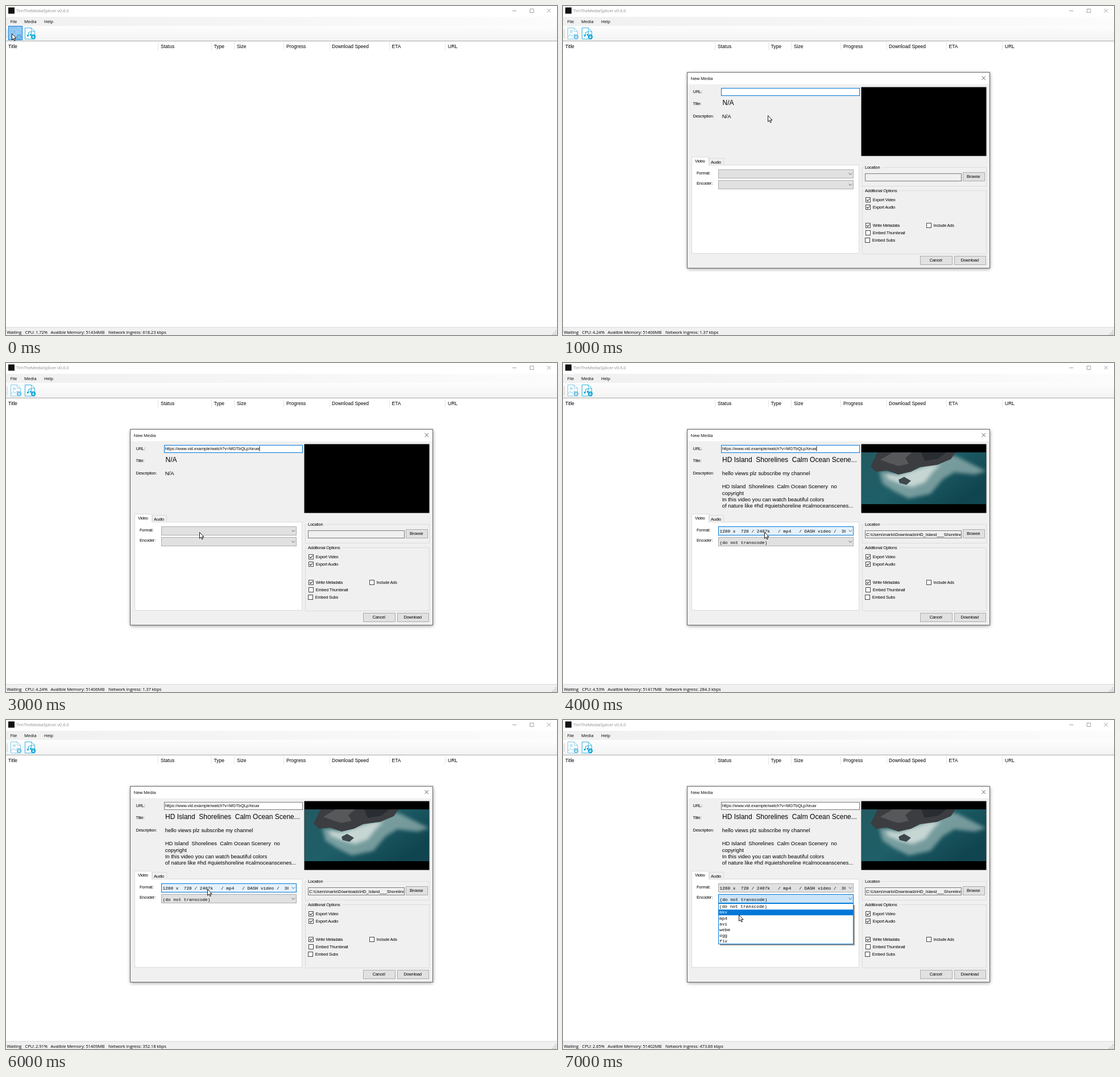
An HTML page that plays this animation: 969 px wide and 578 px high, repeating every 8 s.

```html
<!DOCTYPE html>
<html lang="en">
<head>
<meta charset="utf-8">
<title>Media downloader</title>
<style>
html, body { margin: 0; width: 100%; height: 100%; overflow: hidden; background: #fff; }
#stage { display: block; width: 100vw; height: 100vh; }
text { white-space: pre; fill: #000; }
.ui { font: 7.7px "Open Sans", "Noto Sans", sans-serif; letter-spacing: -.13px; }
.head { font: 8.55px "Liberation Sans", Arial, sans-serif; }
.form { font: 7.4px "Liberation Sans", Arial, sans-serif; letter-spacing: -.2px; }
.field { font: 7.4px "Liberation Sans", Arial, sans-serif; }
.big { font: 12px "Liberation Sans", Arial, sans-serif; }
.desc { font: 9.45px "Liberation Sans", Arial, sans-serif; }
.mono { font: 7.78px "Liberation Mono", "Courier New", monospace; }
.mid { text-anchor: middle; }
#pointer { animation: point 8s step-end infinite; }
@keyframes point {
  0% { transform: translate(10px, 48px); }
  12.5% { transform: translate(360px, 192px); }
  25% { transform: translate(410px, 210px); }
  37.5% { transform: translate(340px, 297px); }
  50% { transform: translate(354px, 297px); }
  87.5%, 100% { transform: translate(309px, 342px); }
}
</style>
</head>
<body>
<svg id="stage" viewBox="0 0 969 578" preserveAspectRatio="none" xmlns="http://www.w3.org/2000/svg"></svg>
<script>
const SECONDS = 8;
const BLUE = '#0078d7', GRAY = '#adadad', FACE = '#f0f0f0', BUTTON = '#e1e1e1';
const HOT = '#e5f1fb', PRESSED = '#cce4f7';
const rules = new Map();

const fill = (x, y, w, h, color, more = '') =>
  `<rect x="${x}" y="${y}" width="${w}" height="${h}" fill="${color}" ${more}/>`;
const box = (x, y, w, h, color, line) =>
  fill(x + .5, y + .5, w - 1, h - 1, color, `stroke="${line}"`);
const path = (d, line, width = 1, color = 'none') =>
  `<path d="${d}" fill="${color}" stroke="${line}" stroke-width="${width}"/>`;
const blob = (d, color, more = '') => `<path d="${d}" fill="${color}" ${more}/>`;
const text = (x, y, s, type, color) =>
  `<text x="${x}" y="${y}" class="${type}"${color ? ` style="fill:${color}"` : ''}>${s}</text>`;
const clip = (x, y, w, h, body) =>
  `<svg x="${x}" y="${y}" width="${w}" height="${h}" viewBox="${x} ${y} ${w} ${h}">${body}</svg>`;

// Shows the body from second a to second b of the loop.
function during(a, b, body) {
  const name = `on${a}to${b}`;
  const at = (t, v) => `${t / SECONDS * 100}%{visibility:${v}}`;
  rules.set(name, `.${name}{animation:${name} ${SECONDS}s step-end infinite}@keyframes ${name}{` +
    (a ? at(0, 'hidden') : '') + at(a, 'visible') +
    (b < SECONDS ? at(b, 'hidden') + at(SECONDS, 'hidden') : at(SECONDS, 'visible')) + '}');
  return `<g class="${name}">${body}</g>`;
}

const cross = (x, y, s, color) => path(`M${x} ${y}l${s} ${s}m0 ${-s}l${-s} ${s}`, color, .8);

function status(cpu, memory, rate) {
  return text(33.5, 575.5, `CPU: ${cpu}%`, 'ui') +
    text(78.5, 575.5, `Availble Memory: ${memory}MB`, 'ui') +
    text(180, 575.5, `Network Ingress: ${rate} kbps`, 'ui');
}

function page(x, color, art) {
  return path(`M${x} 38.5h11l6 6v13.5h-17z`, color, .9, '#fff') + path(`M${x + 11} 38.5v6h6`, color, .7) +
    art + `<circle cx="${x + 14.5}" cy="54" r="4.3" fill="${color}"/>` +
    path(`M${x + 14.5} 51.5v4.5m-2 -2l2 2.2l2 -2.2`, '#fff', 1);
}

function mainWindow() {
  const columns = [['Title', 4], ['Status', 272], ['Type', 365.5], ['Size', 406], ['Progress', 493],
    ['Download Speed', 573], ['ETA', 678.5], ['URL', 777]];
  const picture = '#6fc0e6', music = '#14a9d8', control = '#888';
  return fill(0, 0, 969, 578, '#fff') +
    fill(4, 2.5, 11, 11, '#111') +
    text(18, 11.2, 'TimTheMediaSplicer v0.6.0', 'ui', '#8f8f8f') +
    path('M890.5 8.5h7', control, .8) + path('M921.5 5.2h6.3v6.3h-6.3z', control, .8) +
    cross(951.5, 5, 6.5, control) +
    fill(0, 19, 969, 16, 'url(#menu)') +
    text(7.5, 29.7, 'File', 'ui') + text(32, 29.7, 'Media', 'ui') + text(67, 29.7, 'Help', 'ui') +
    fill(0, 35, 969, 26, 'url(#tools)') + fill(0, 61, 969, 1, '#a6a9a8') +
    fill(1.5, 40, 1, 16, 'url(#grip)') +
    during(0, 1, box(4, 35, 25, 25, '#96cbf4', BLUE)) +
    during(1, 8, page(8.5, picture,
      `<circle cx="14.5" cy="45" r="1.8" fill="none" stroke="${picture}"/>` +
      path('M9 54l4 -4l3 3l4 -4l5 4', picture, .9))) +
    during(0, 1, `<g opacity=".4">${path('M8.5 38.5h11l6 6v13.5h-17z', '#4ba6dc', 1, '#91c9f5')}</g>` +
      '<circle cx="14.5" cy="45" r="1.8" fill="none" stroke="#6db5e5"/><circle cx="23" cy="54" r="4.3" fill="#56aae1"/>' +
      path('M23 51.5v4.5m-2 -2l2 2.2l2 -2.2', '#b5dcf7')) +
    page(33.5, music, path('M39.5 52v-5.5l5 -1.5v5.5', music, 1) +
      `<circle cx="38.3" cy="52" r="1.7" fill="${music}"/><circle cx="43.3" cy="50.6" r="1.7" fill="${music}"/>`) +
    columns.map(([s, x]) => text(x, 74, s, 'head')).join('') +
    [267, 361, 401, 488, 569, 674, 772].map(x => fill(x, 63, 1, 15, '#e5e5e5')).join('') +
    fill(0, 564, 969, 14, FACE) + fill(0, 564, 969, 1, '#dcdcdc') +
    [[966, 570], [966, 573], [966, 576], [963, 573], [963, 576], [960, 576]]
      .map(([x, y]) => fill(x, y, 1.5, 1.5, '#aaa')).join('') +
    text(1.5, 575.5, 'Waiting', 'ui') +
    during(0, 1, status('1.72', 51434, '618.23')) +
    during(1, 4, status('4.24', 51406, '1.37')) +
    during(4, 6, status('4.53', 51417, '284.3')) +
    during(6, 7, status('2.91', 51409, '352.18')) +
    during(7, 8, status('2.65', 51402, '473.86'));
}

const button = (x, y, w, h, s) =>
  box(x, y, w, h, BUTTON, GRAY) + text(x + w / 2 - .8, y + 10.4, s, 'form mid');

const check = (x, y, s, on) => box(x, y, 9, 9, '#fff', '#444') +
  (on ? path(`M${x + 2} ${y + 4.5}l2 2l3.3 -4`, '#222', 1.1) : '') + text(x + 12.7, y + 7.2, s, 'form');

const group = (y, h, s, w) => box(526, y, 219, h, 'none', '#dcdcdc') +
  fill(529, y - 1, w, 3, FACE) + text(531, y + 3, s, 'form');

const combo = (y, color = BUTTON, line = GRAY) =>
  box(273, y, 238, 16, color, line) + path(`M502.5 ${y + 6.5}l2.8 2.8l2.8 -2.8`, '#555', .9);

// One fixed-width line of the format list.
function formatLine(spec) {
  const [w, h, rate, type, mode, codec] = spec.split(' ');
  const kind = mode === 'D' ? 'DASH video /  30fps ' : `${mode}   /    --- `;
  return `${w.padEnd(4)} x  ${h} / ${rate.padEnd(7)} / ${type.padEnd(5)} / ${kind}${codec}`;
}

const formats = ['1280 720 2407k mp4 D avc1.4d401f', '1280 720 1717k mp4 720p avc1.64001F',
  '1280 720 2407k mp4 D avc1.4d401f', '1280 720 1505k webm D vp9', '854 480 1155k mp4 D avc1.4d4014',
  '854 480 752k webm D vp9', '640 360 622k mp4 360p avc1.42001E', '640 360 --- webm 360p vp8.0',
  '640 360 663k mp4 D avc1.4d401e', '640 360 405k webm D vp9', '426 240 242k mp4 D avc1.4d400c',
  '426 240 220k webm D vp9', '256 144 108k mp4 D avc1.4d400b', '256 144 95k webm D vp9'].map(formatLine);
formats[0] += ' [Recommended]';
const encoders = ['(do not transcode)', 'mkv', 'mp4', 'avi', 'webm', 'ogg', 'flv'];

function dropList(y, w, h, rows, picked) {
  const step = 10.05;
  return fill(276, y + 3, w - 1, h - 1, '#000', 'opacity=".4"') + box(273, y, w, h, '#fff', BLUE) +
    fill(274, y + 1 + picked * step, w - 2, step, BLUE) +
    clip(274, y, w - 2, h - 1, rows.map((s, i) =>
      text(275, y + 8.4 + i * step, s, 'mono', i === picked ? '#fff' : '')).join(''));
}

// Dark rocks over a teal sea with soft surf.
function photo() {
  const surf = 'filter="url(#surf)"';
  return clip(525, 157, 219, 91, fill(525, 157, 219, 91, 'url(#sea)') +
    blob('M556 190l30 2l22 -8l36 -8l32 -14l16 2l52 26l-20 6l-36 -4l-20 12l-22 26l-38 8l-24 -12l-22 -14z', '#b4c9c6', surf + ' opacity=".6"') +
    blob('M566 194l24 4l22 -8l30 -10l22 -2l-14 14l-14 18l-22 8l-22 -6l-20 -8z', '#e0e9e5', surf + ' opacity=".75"') +
    blob('M541 182l12 -25h137l-8 12l-24 10l-30 4l-16 8l-22 5l-20 -7l-20 2z', '#3b3d41') +
    blob('M558 170l22 -13h34l-12 10l6 10l-18 4l-16 -5z', '#56585a') +
    blob('M630 157h44l-14 11l-24 4z', '#292c31') +
    blob('M590 205l10 -5l12 7l-8 7l-12 -3z', '#3d484d'));
}

function dialog() {
  const na = text(280.5, 173.8, 'N/A', 'big') + text(279.7, 197, 'N/A', 'desc');
  const lines = [[197, 'hello views plz subscribe my channel'],
    [220, 'HD Island  Shorelines  Calm Ocean Scenery  no'], [231.5, 'copyright'],
    [243, 'In this video you can watch beautiful colors'],
    [254.3, 'of nature like #hd #quietshoreline #calmoceanscenes...']];
  return fill(219, 118, 532, 344, '#000', 'opacity=".42" filter="url(#soft)"') +
    box(218, 116, 533, 345, FACE, '#666') + fill(219, 117, 531, 20.5, '#fff') +
    text(224.5, 130, 'New Media', 'ui') + cross(736.5, 123.3, 6.6, '#333') +
    text(228.5, 152.6, 'URL:', 'form') + text(228.5, 174, 'Title:', 'form') +
    text(228.5, 196.3, 'Description:', 'form') +
    box(278, 144, 244, 14, '#fff', '#7a7a7a') + during(1, 5, box(278, 144, 244, 14, '#fff', BLUE)) +
    during(2, 8, text(279.7, 153.4, 'https://www.vid.example/watch?v=MGTbQLpXeuw', 'field')) +
    during(2, 5, fill(445.5, 146, .9, 9, '#000')) +
    fill(524.5, 142.5, 220, 121, '#000') +
    during(1, 4, na) +
    // tabs
    box(226, 279, 295, 156, '#fff', '#dcdcdc') + box(257, 267, 26, 13, FACE, '#dcdcdc') +
    box(226, 265, 31, 15, '#fff', '#dcdcdc') + fill(227, 278, 29, 3, '#fff') +
    text(232, 275.3, 'Video', 'form') + text(260, 276.6, 'Audio', 'form') +
    text(235, 296.2, 'Format:', 'form') + text(235, 314.4, 'Encoder:', 'form') +
    combo(287) + combo(306) +
    during(4, 5, combo(287, HOT, BLUE)) + during(5, 6, combo(287, PRESSED, BLUE)) +
    during(6, 7, combo(287, HOT, BLUE)) + during(7, 8, combo(306, PRESSED, BLUE)) +
    // options
    group(283, 34, 'Location', 32) + box(531, 294, 170, 14, FACE, '#7a7a7a') +
    button(703, 292, 39, 16, 'Browse') + group(324, 112, 'Additional Options', 62) +
    check(532, 336, 'Export Video', true) + check(532, 349, 'Export Audio', true) +
    check(532, 381, 'Write Metadata', true) + check(532, 394, 'Embed Thumbnail') +
    check(531, 407, 'Embed Subs') + check(639, 381, 'Include Ads') +
    button(628, 439, 57, 16, 'Cancel') + button(688, 439, 56, 16, 'Download') +
    during(4, 8, text(280, 173.8, 'HD Island  Shorelines  Calm Ocean Scene...', 'big') +
      lines.map(([y, s]) => text(279.7, y, s, 'desc')).join('') + photo() +
      clip(274, 288, 223, 14, text(275.5, 298.4, formats[0], 'mono')) +
      text(275.5, 317.6, encoders[0], 'mono') +
      clip(532, 295, 167.5, 12,
        text(533, 303.5, 'C:\\Users\\marlo\\Downloads\\HD_Island___Shorelines___Calm', 'field'))) +
    during(5, 6, dropList(303, 402, 142, formats, 0)) +
    during(7, 8, dropList(322, 238, 72, encoders, 1));
}

const defs = `<defs>
  <linearGradient id="menu"><stop stop-color="#f0f0f0"/><stop offset="1" stop-color="#fcfcfc"/></linearGradient>
  <linearGradient id="tools" x2="0" y2="1"><stop stop-color="#fdfdfd"/><stop offset="1" stop-color="#f3f3f3"/></linearGradient>
  <linearGradient id="sea" x2="1" y2=".6"><stop stop-color="#235a61"/><stop offset=".5" stop-color="#1f5f68"/><stop offset="1" stop-color="#10454f"/></linearGradient>
  <pattern id="grip" width="1" height="3" patternUnits="userSpaceOnUse"><rect width="1" height="1.4" fill="#999"/></pattern>
  <filter id="soft" x="-5%" y="-5%" width="110%" height="110%"><feGaussianBlur stdDeviation="3"/></filter>
  <filter id="surf" x="-10%" y="-20%" width="120%" height="140%"><feGaussianBlur stdDeviation="3"/></filter>
</defs>`;

const pointer = `<g id="pointer">${path('M.5 .5v10.8l2.5 -2.3l1.7 3.8l1.7 -.8l-1.7 -3.6h3.3z', '#000', .9, '#fff')}</g>`;

document.getElementById('stage').innerHTML = defs + mainWindow() + during(1, 8, dialog()) + pointer;
const sheet = document.createElement('style');
sheet.textContent = [...rules.values()].join('\n');
document.head.append(sheet);
</script>
</body>
</html>
```
